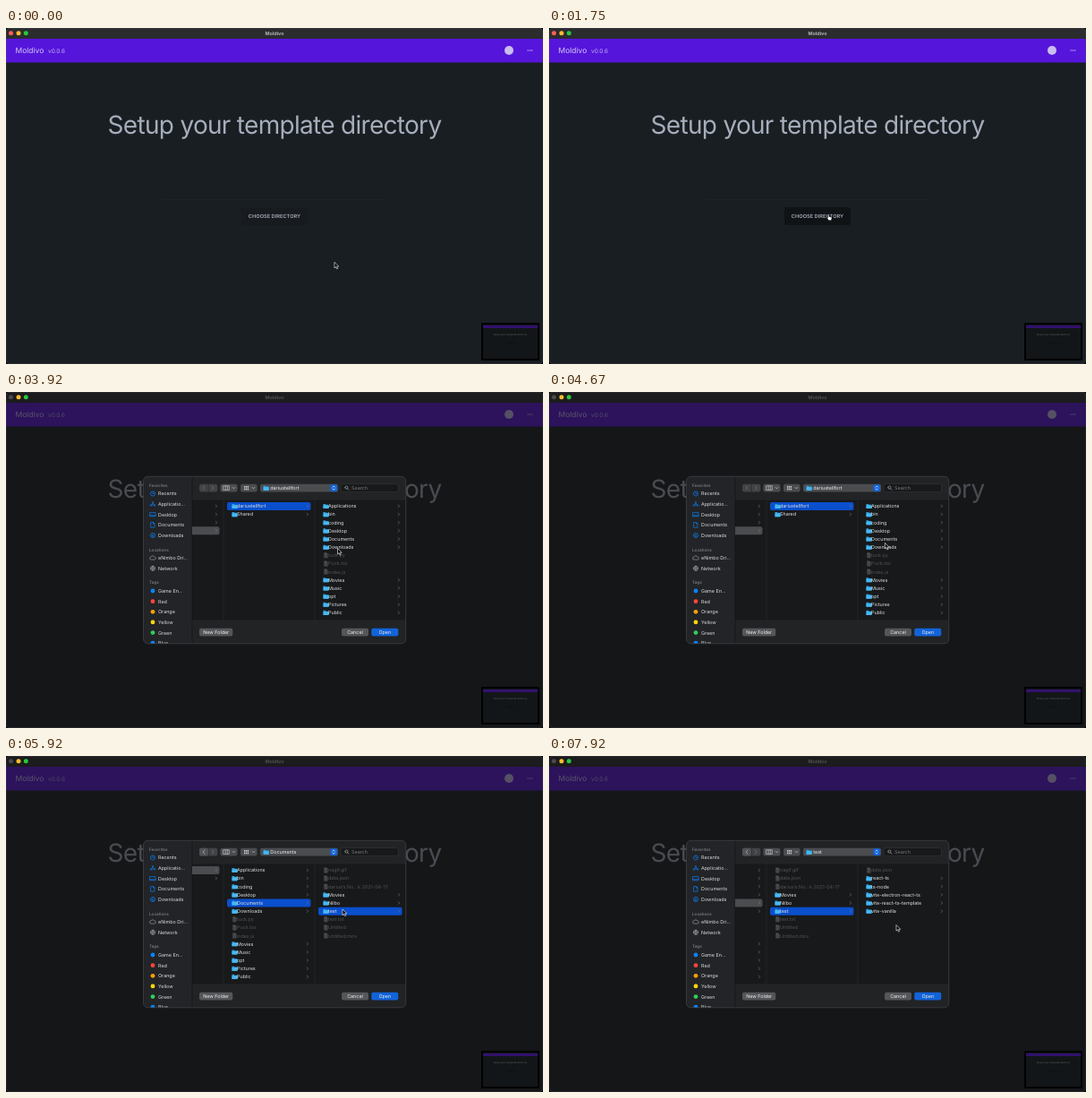
These frames come from a looping animation (600x375 px, 8 s). An HTML page:

```html
<!DOCTYPE html>
<html lang="en">
<head>
<meta charset="utf-8">
<title>Moldivo</title>
<style>
  html, body { margin: 0; width: 100%; height: 100%; overflow: hidden; background: #000; }
  svg { display: block; width: 100vw; height: 100vh; }
  text { font-family: Inter, Roboto, sans-serif; font-optical-sizing: none; text-rendering: geometricPrecision; white-space: pre; }
</style>
</head>
<body>
<svg id="stage" viewBox="0 0 600 375"></svg>
<script>
const LOOP = 8000;
const ROW_TOP = 127.4, ROW_STEP = 9.15, COL_LEFT = 141, COL_WIDTH = 102;
const BLUE = '#0a4fcc', GREY = '#4a4c4f', ICON = '#0a84ff';
const USER = 'dariustellfort';

const rect = (x, y, w, h, fill, r = 0, extra = '') =>
  `<rect x="${x}" y="${y}" width="${w}" height="${h}" rx="${r}" fill="${fill}" ${extra}/>`;
const dot = (x, y, r, fill, extra = '') => `<circle cx="${x}" cy="${y}" r="${r}" fill="${fill}" ${extra}/>`;
const line = (d, color, width = .7) =>
  `<path d="${d}" fill="none" stroke="${color}" stroke-width="${width}" stroke-linecap="round" stroke-linejoin="round"/>`;
const text = (s, x, y, size, fill, extra = '') =>
  `<text x="${x}" y="${y}" font-size="${size}" fill="${fill}" ${extra}>${s}</text>`;
const MIDDLE = 'text-anchor="middle"';

const folder = (x, y) =>
  `<path d="M${x} ${y - 2.5}h2.2l.8.8h3v4.3h-6z" fill="#2f9fe0"/>` + rect(x, y - 1, 6, 3.6, '#45b8f2', .4);
const file = (x, y) =>
  `<path d="M${x + .8} ${y - 3}h2.8l1.4 1.4v4.6h-4.2z" fill="#4a4c4e"/>` +
  line(`M${x + 1.8} ${y}h2.2m-2.2 1.3h2.2`, '#303234', .4);
const chevron = (x, y, color = '#7c7e81') => line(`M${x - .7} ${y - 1.4}l1.4 1.4l-1.4 1.4`, color, .6);

// A leading "/" marks a folder.
const columns = [
  ['/', '/', '/', '/'],
  ['/' + USER, '/Shared'],
  ['/Applications', '/bin', '/coding', '/Desktop', '/Documents', '/Downloads', 'tuck.py', 'Puck.tsx', 'index.js',
    '/Movies', '/Music', '/opt', '/Pictures', '/Public'],
  ['nagif.gif', 'data.json', 'darius’s No…k 2021-04-17', '/Movies', '/Nilbo', '/test', 'text.txt', 'Untitled', 'Untitled.mov'],
  ['data.json', '/react-ts', '/ts-node', '/vite-electron-react-ts', '/vite-react-ts-template', '/vite-vanilla']
];
const selectedRow = [3, 0, 4, 5];

function column(names, index) {
  const x = COL_LEFT + index * COL_WIDTH;
  const rows = names.map((name, i) => {
    const y = ROW_TOP + i * ROW_STEP, isFolder = name[0] === '/';
    return (isFolder ? folder(x + 210 - 200 - .5, y) + chevron(x + 94, y) : file(x + 9.5, y)) +
      text(name.replace('/', ''), x + 117 - 102, y + 1.9, 5.4, isFolder ? '#e2e3e5' : '#515356');
  }).join('');
  const mark = index < selectedRow.length
    ? rect(x + 4, ROW_TOP + selectedRow[index] * ROW_STEP - 4.5, 93.5, 9, GREY, 2, `id="mark${index}"`) : '';
  return `<g id="col${index}">${mark}${rows}${line(`M${x + COL_WIDTH} 120V255`, '#2c2e31', .6)}</g>`;
}

function sidebar() {
  const head = (s, y) => text(s, 160, y + 1.7, 4.6, '#77797d', 'font-weight="600"');
  const item = (s, y, icon, color = ICON) =>
    `<g transform="translate(164 ${y})">${line(icon, color, .65)}</g>` + text(s, 170, y + 1.9, 5.4, '#dddfe1');
  const tags = [['Game En…', ICON], ['Red', '#ff453a'], ['Orange', '#ff9f0a'], ['Yellow', '#ffd60a'], ['Green', '#30d158'], ['Blue', ICON]];
  return head('Favorites', 104) +
    item('Recents', 113.5, 'M-2.6 0a2.6 2.6 0 1 0 5.2 0a2.6 2.6 0 1 0-5.2 0M0-1.5V0h1.3') +
    item('Applicatio…', 125.2, 'M-2.3 2.4L.5-2.6M2.3 2.4L-.5-2.6M-3 .9H3') +
    item('Desktop', 136.8, 'M-3-2.2H3V2H-3zM-3 1H3') +
    item('Documents', 148.4, 'M-2-2.8H.7L2-1.5V2.8H-2zM.5-2.7v1.3H2') +
    item('Downloads', 160, 'M-2.6 0a2.6 2.6 0 1 0 5.2 0a2.6 2.6 0 1 0-5.2 0M0-1.4V1.3M-1 .4L0 1.4L1 .4') +
    head('Locations', 176) +
    item('eNimbo Dri…', 185.2, 'M-2 1.9a1.5 1.5 0 0 1 0-3a2 2 0 0 1 3.7 0a1.5 1.5 0 0 1 .4 3z', '#a0a2a5') +
    item('Network', 196.8, 'M-2.6 0a2.6 2.6 0 1 0 5.2 0a2.6 2.6 0 1 0-5.2 0M-2.6 0H2.6M0-2.6Q-2.2 0 0 2.6Q2.2 0 0-2.6', '#a0a2a5') +
    head('Tags', 212.5) +
    tags.map(([name, color], i) => {
      const y = 222 + i * 11.65;
      return dot(164, y, 2.4, color) + text(name, 170, y + 1.9, 5.4, '#dddfe1');
    }).join('');
}

function toolbar() {
  const down = x => line(`M${x - 1.3} 106.5l1.3 1.3l1.3-1.3`, '#d0d2d4', .7);
  return rect(216, 102.8, 20.3, 8.6, '#414346', 2) + line('M226.2 103V111.2', '#222426', .6) +
    `<g id="back">${rect(216, 102.8, 9.9, 8.6, '#505256', 2)}${line('M221.8 105.2l-1.7 1.9l1.7 1.9', '#eee', .8)}</g>` +
    line('M221.8 105.2l-1.7 1.9l1.7 1.9M230.4 105.2l1.7 1.9l-1.7 1.9', '#77797c', .7) +
    rect(239.5, 102.8, 19, 8.6, GREY, 2) + line('M243 104.8h6.4v4.6h-6.4zM245.1 105v4.3M247.3 105v4.3', '#d0d2d4', .6) + down(254.5) +
    rect(262, 102.8, 18.6, 8.6, GREY, 2) +
    [0, 1, 2].map(i => rect(266 + i * 1.9, 105, 1.3, 1.7, '#d0d2d4') + rect(266 + i * 1.9, 107.6, 1.3, 1.7, '#d0d2d4')).join('') + down(276.5) +
    rect(284, 102.8, 87, 8.6, GREY, 2) + folder(287.6, 107.2) +
    text('', 295.3, 109, 5.4, '#f0f0f1', 'id="place"') +
    rect(362.3, 103.2, 7.8, 7.8, '#1263d8', 1.8) + line('M365 106.2l1.2-1.3l1.2 1.3M365 108l1.2 1.3l1.2-1.3', '#fff', .7) +
    rect(374, 102.6, 64.5, 9, '#18191b', 2, 'stroke="#3a3c3f" stroke-width=".5"') +
    line('M378.8 106.6a1.6 1.6 0 1 0 3.2 0a1.6 1.6 0 1 0-3.2 0M381.6 107.8l1.4 1.5', '#b5b7ba', .6) +
    text('Search', 386, 109, 5.4, '#797b7e');
}

function dialog() {
  const button = (s, x, w, fill) => rect(x, 263.8, w, 8.8, fill, 2) + text(s, x + w / 2, 270.1, 5.4, '#f0f0f1', MIDDLE);
  return `<g id="dialog">${rect(153.5, 94.3, 293.3, 186.5, '#1c1d1f', 5)}
    <g clip-path="url(#panel)">
      ${rect(153, 94, 55, 187, '#222427')}${rect(208, 94, 239, 26, '#212325')}
      ${rect(208, 120, 239, 135, '#18191b')}${rect(208, 255, 239, 26, '#212325')}
      ${line('M208 94V281', '#111214', .6)}${line('M208 120H447M208 255H447', '#2a2c2e', .5)}
      ${sidebar()}
    </g>
    ${toolbar()}
    <g clip-path="url(#browser)"><g id="strip">${columns.map(column).join('')}</g></g>
    ${button('New Folder', 216, 37.3, '#545659')}${button('Cancel', 375, 30, '#545659')}${button('Open', 408.3, 30, '#1263d8')}
    ${rect(153.5, 94.3, 293.3, 186.5, 'none', 5, 'stroke="#4a4c4f" stroke-width=".6"')}</g>`;
}

const heading = 'Setup your template directory';
const app =
  rect(0, 0, 600, 375, '#191e22', 4) + rect(0, 0, 600, 13, '#2b2c2e', 4) +
  text('Moldivo', 300, 7.8, 5.4, '#b4b5b8', MIDDLE + ' font-weight="700"') +
  rect(0, 12, 600, 26.5, '#5615db') +
  text('Moldivo', 10.5, 28.2, 8.5, '#d3c5f7') + text('v0.0.6', 47, 27.6, 6.5, '#c0a8f2') +
  dot(562, 25, 5, '#c9bdf0') + [583.2, 585.4, 587.6].map(x => dot(x, 25, .7, '#cfc2f5')).join('') +
  text(heading, 300, 117.5, 28, '#a6adbb', MIDDLE + ' letter-spacing="-.025em"') +
  line('M175 191.3H425', '#22272b', .6) +
  rect(263, 200, 74, 20, '#171b1f', 3) + rect(263, 200, 74, 20, '#101316', 3, 'id="hover"') +
  text('CHOOSE DIRECTORY', 300, 212.1, 5.7, '#a6adbb', MIDDLE + ' font-weight="600"');

const preview =
  rect(531, 329, 65, 42, '#000', 1) + rect(533, 331, 61, 38, '#131618') +
  rect(533, 332, 61, 3, '#32116d') + text(heading, 563.5, 343, 2.7, '#5c5f64', MIDDLE) +
  rect(559, 350.5, 9, 2, '#101214');

const stage = document.getElementById('stage');
stage.innerHTML = `<defs>
    <clipPath id="panel">${rect(153.5, 94.3, 293.3, 186.5, '#fff', 5)}</clipPath>
    <clipPath id="browser">${rect(208, 120, 239, 135, '#fff')}</clipPath>
  </defs>${app}
  ${rect(0, 0, 600, 375, '#141214', 4, 'id="shade"')}
  ${dot(5.5, 5.7, 2.5, '#ff5f57', 'id="close"')}${dot(14, 5.7, 2.5, '#febc2e')}${dot(22.3, 5.7, 2.5, '#28c840')}
  ${rect(.25, .25, 599.5, 374.5, 'none', 4, 'stroke="#55585c" stroke-opacity=".6" stroke-width=".5"')}
  ${preview}${dialog()}
  <g id="pointer">
    <path id="arrow" d="M0 0V6.6L1.5 5.2L2.6 7.6L3.7 7.1L2.6 4.8H4.7Z" fill="#000" stroke="#fff" stroke-width=".6"/>
    <path id="hand" d="M-.6 .6Q.1-.3.7.6V2.7L3 3.2Q3.9 3.5 3.7 4.6L3.1 7H.3L-1.6 4.4Q-1.6 3.5-.6 4.1Z" fill="#fff" stroke="#000" stroke-width=".5"/>
  </g>`;
const el = Object.fromEntries([...stage.querySelectorAll('[id]')].map(node => [node.id, node]));

// Pointer tip: time, x, y
const path = [
  [0, 367, 261.3], [80, 367, 261.3], [170, 345, 240], [500, 345, 240], [900, 314, 208], [1750, 312.3, 207.8],
  [2500, 310.5, 207.5], [3400, 310.5, 207.5], [3920, 370.5, 174.5], [4500, 374, 170], [5000, 379, 164],
  [5400, 379, 164], [5800, 376, 171], [6250, 376, 171], [6700, 377.5, 125], [7170, 377.5, 125], [7850, 388, 188.5], [LOOP, 388, 188.5]
];
const progress = (t, from, to) => {
  const p = Math.min(1, Math.max(0, (t - from) / (to - from)));
  return p * p * (3 - 2 * p);
};
function pointerAt(t) {
  const i = path.findIndex(key => key[0] > t);
  const [t0, x0, y0] = path[i - 1], [t1, x1, y1] = path[i];
  const p = progress(t, t0, t1);
  return [x0 + (x1 - x0) * p, y0 + (y1 - y0) * p];
}
const show = (node, on) => node.setAttribute('visibility', on ? 'inherit' : 'hidden');

function draw() {
  const t = performance.now() % LOOP;
  const [x, y] = pointerAt(t);
  const inDocuments = t >= 5250, inTest = t >= 6000;
  const overButton = t < 3200 && x > 263 && x < 337 && y > 200 && y < 220;

  el.pointer.setAttribute('transform', `translate(${x} ${y})`);
  show(el.hand, overButton);
  show(el.arrow, !overButton);
  el.hover.setAttribute('opacity', progress(t, 650, 900));
  el.shade.setAttribute('opacity', .63 * progress(t, 3400, 3620));
  el.close.setAttribute('fill', t < 3500 ? '#ff5f57' : '#4a4a4c');

  el.dialog.setAttribute('opacity', progress(t, 3480, 3720));
  const scroll = progress(t, 5250, 5500) + progress(t, 6000, 6250);
  el.strip.setAttribute('transform', `translate(${-COL_WIDTH * scroll} 0)`);
  el.place.textContent = inTest ? 'test' : inDocuments ? 'Documents' : USER;
  show(el.back, inDocuments);
  show(el.col3, inDocuments);
  show(el.col4, inTest);
  show(el.mark2, t >= 5080);
  show(el.mark3, t >= 5920);
  el.mark1.setAttribute('fill', inDocuments ? GREY : BLUE);
  el.mark2.setAttribute('fill', inTest ? GREY : BLUE);
  el.mark3.setAttribute('fill', BLUE);
  requestAnimationFrame(draw);
}
draw();
</script>
</body>
</html>
```
